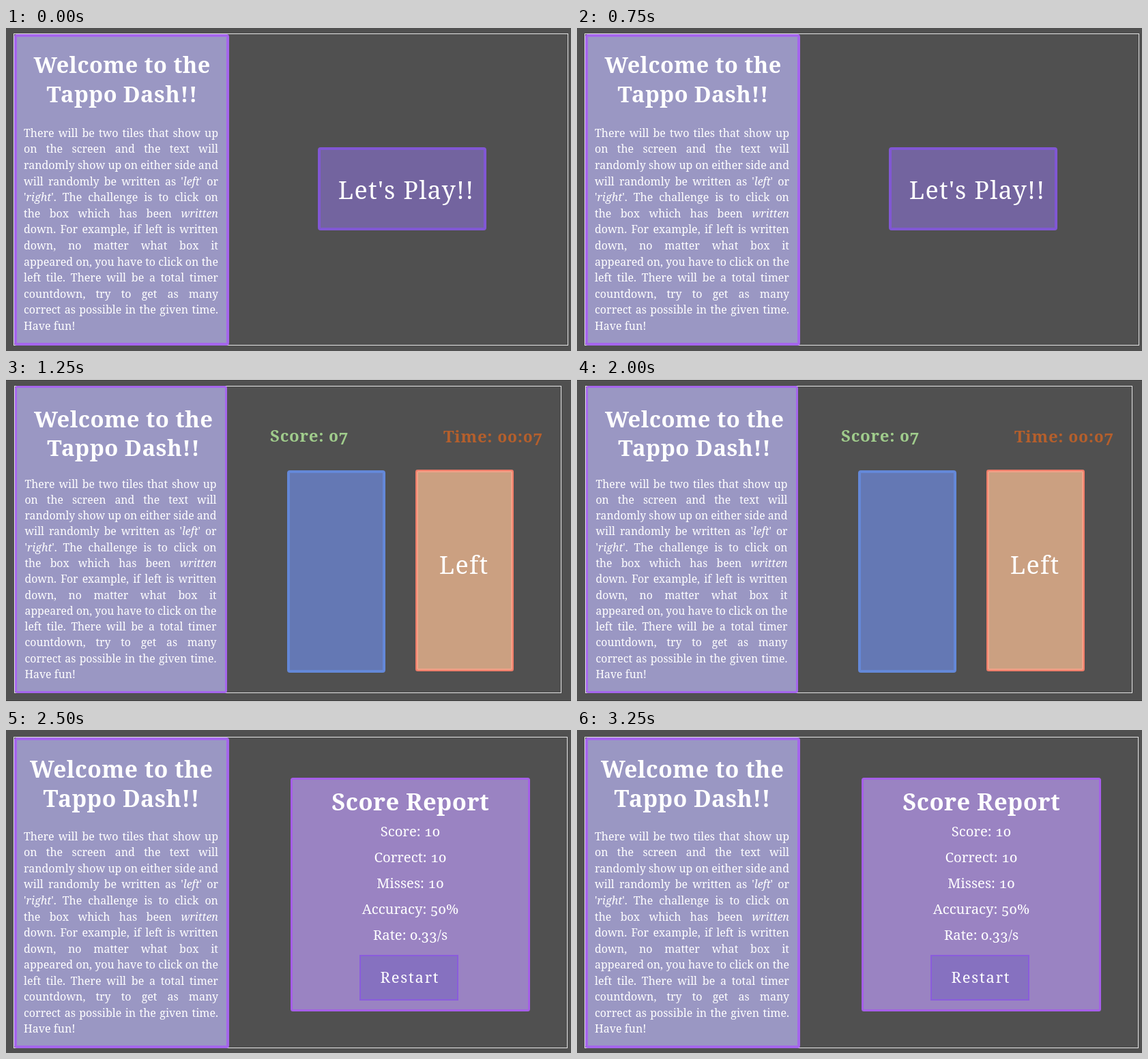
Write an HTML page that moves like this. It is 828 by 474 pixels and loops after 3.75 s.

```html
<!DOCTYPE html>
<html lang="en">
<head>
<meta charset="utf-8">
<title>Two tile game</title>
<style>
  html, body { margin: 0; width: 100%; height: 100%; overflow: hidden; background: #505050; }
  #stage { position: relative; width: 828px; height: 474px; overflow: hidden;
    font-family: "Noto Serif", serif; font-variant-numeric: oldstyle-nums; color: #fff; }
  svg { position: absolute; left: 0; top: 0; }
  #rules { position: absolute; }
  #rules div { display: flex; justify-content: space-between; white-space: nowrap; }
  #rules div:last-child { justify-content: flex-start; gap: .27em; }
</style>
</head>
<body>
<div id="stage">
  <svg id="art" width="828" height="474" viewBox="0 0 828 474"></svg>
  <div id="rules"></div>
</div>
<script>
const HOLD = 1250;
const art = document.getElementById('art');
const rules = document.getElementById('rules');

const lines = [
  'There will be two tiles that show up',
  'on the screen and the text will',
  'randomly show up on either side and',
  "will randomly be written as '*left*' or",
  "'*right*'. The challenge is to click on",
  'the box which has been *written*',
  'down. For example, if left is written',
  'down, no matter what box it',
  'appeared on, you have to click on the',
  'left tile. There will be a total timer',
  'countdown, try to get as many',
  'correct as possible in the given time.',
  'Have fun!'
];

const word = w => `<span>${w.replace(/\*(.+?)\*/g, '<i>$1</i>')}</span>`;
rules.innerHTML = lines.map(l => `<div>${l.split(' ').map(word).join(' ')}</div>`).join('');

// Box given by its outer edges, with the border inside them.
function box(x0, y0, x1, y1, fill, stroke, w, r = 2) {
  return `<rect x="${x0 + w / 2}" y="${y0 + w / 2}" width="${x1 - x0 - w}" height="${y1 - y0 - w}"
    rx="${r}" fill="${fill}" stroke="${stroke}" stroke-width="${w}"/>`;
}

function label(str, x, y, size, { bold = false, gap = bold ? 0.45 : 0, color = '#fff', anchor = 'middle' } = {}) {
  const cx = anchor === 'middle' ? x + gap / 2 : x;
  return `<text x="${cx}" y="${y}" font-size="${size}" font-weight="${bold ? 700 : 400}"
    letter-spacing="${gap}" text-anchor="${anchor}" fill="${color}">${str}</text>`;
}

const startView = () =>
  box(457, 175, 704, 297, '#73649f', '#8157d4', 4) +
  label("Let's Play!!", 586, 251, 36, { gap: 1.25 });

const counter = (str, x, y, color) =>
  label(str, x, y, 24, { bold: true, gap: 0.7, color, anchor: 'start' });

const playView = () =>
  '<path d="M0 .5H828M0 473.5H828" stroke="#fff"/>' +
  counter('Score: 07', 387, 92, '#a0cc8c') +
  counter('Time: 00:07', 641, 93, '#b55f2c') +
  box(412, 134, 556, 431, '#6478b4', '#6488d8', 4) +
  box(600, 133, 744, 429, '#cba081', '#ee7c69', 2.5) +
  box(602, 135, 742, 427, 'none', '#f3a288', 2, 1) +
  label('Left', 670.5, 286, 36, { gap: 1.25 });

const stats = ['Score: 10', 'Correct: 10', 'Misses: 10', 'Accuracy: 50%', 'Rate: 0.33/s'];
const reportView = () =>
  box(417, 70, 768, 413, '#9a83c2', '#a55fe8', 3) +
  label('Score Report', 592.5, 118, 34.5, { bold: true }) +
  stats.map((s, i) => label(s, 592.5, 155.5 + 38.2 * i, 20.3)).join('') +
  box(518, 330, 663, 397, '#8671c0', '#8a5cdc', 2, 0) +
  label('Restart', 591, 371, 22, { gap: 1.8 });

// frame: white outline; panel: side box; head: centre, two baselines, size;
// text: left, width, first baseline, pitch, size
const scenes = [
  { view: startView, frame: [11, 8, 824, 466], panel: [12, 9, 327, 466], edge: 4,
    head: [170, 66, 108.5, 32.4], text: [26, 285, 160.8, 23.6, 16] },
  { view: playView, frame: [12, 10, 814, 461], panel: [13, 10, 324, 461], edge: 3,
    head: [172, 70.5, 112.5, 32.8], text: [27.5, 281, 160.3, 23.3, 15.8] },
  { view: reportView, frame: [11, 10, 823, 467], panel: [12, 11, 327, 467], edge: 4,
    head: [169, 69.5, 113, 33.6], text: [26, 285, 162.8, 23.55, 16] }
];

function draw(s) {
  const [cx, y1, y2, size] = s.head;
  art.innerHTML = '<rect width="828" height="474" fill="#505050"/>' +
    box(...s.frame, 'none', '#e4e4e4', 1, 0) +
    box(...s.panel, '#9a97c3', '#a566ec', s.edge) +
    label('Welcome to the', cx, y1, size, { bold: true }) +
    label('Tappo Dash!!', cx, y2, size, { bold: true }) +
    s.view();

  const [left, width, base, pitch, fs] = s.text;
  Object.assign(rules.style, {
    left: left + 'px', width: width + 'px', fontSize: fs + 'px', lineHeight: pitch + 'px',
    top: base - pitch / 2 - fs * 0.388 + 'px'
  });
}

let shown = -1;
const start = performance.now();
function tick() {
  const t = Math.max(0, performance.now() - start);
  const i = Math.floor(t / HOLD) % scenes.length;
  if (i !== shown) draw(scenes[shown = i]);
  requestAnimationFrame(tick);
}
tick();
</script>
</body>
</html>
```
